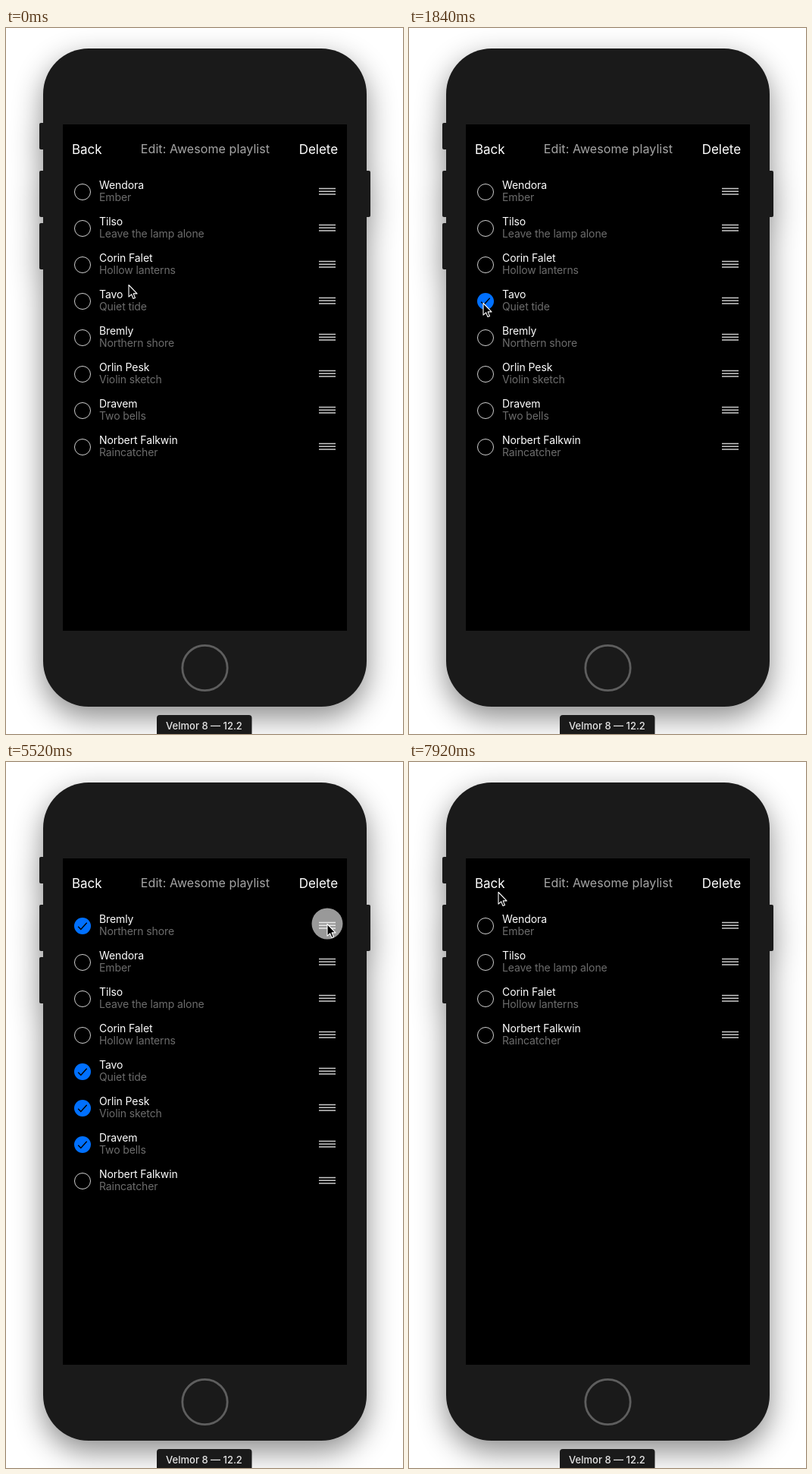
Write an HTML page that moves like this. It is 524 px wide and 930 px high and loops after 8 s.

```html
<!DOCTYPE html>
<html lang="en">
<head>
<meta charset="utf-8">
<title>Playlist editor</title>
<style>
  html, body { margin: 0; width: 100%; height: 100%; overflow: hidden; background: #fff; }
  .stage { position: relative; width: 524px; height: 930px; overflow: hidden; }
  .phone { position: absolute; inset: 0; filter: drop-shadow(0 14px 19px rgba(0, 0, 0, .46)); }
  .phone div { position: absolute; background: #1a1a1a; }
  .body { left: 49px; top: 27px; width: 427px; height: 867px; border-radius: 60px; }
  .key { left: 44px; width: 8px; height: 61px; border-radius: 2px; }
  svg { position: absolute; left: 0; top: 0; }
  text { font-family: Inter, Roboto, sans-serif; }
  .bar { font-size: 17px; letter-spacing: -.05px; fill: #fff; }
  .title { font-size: 16px; fill: #a6a6a6; letter-spacing: .08px; }
  .name, .song { font-size: 14px; letter-spacing: -.1px; fill: #fff; }
  .song { fill: #6c6c6c; }
  .model { font-size: 13px; font-weight: 500; fill: #e6e6e6; }
</style>
</head>
<body>
<div class="stage">
  <div class="phone">
    <div class="key" style="top: 125px; height: 35px"></div>
    <div class="key" style="top: 188px"></div>
    <div class="key" style="top: 257px"></div>
    <div class="key" style="top: 188px; left: 473px"></div>
    <div class="body"></div>
  </div>
  <svg width="524" height="930" viewBox="0 0 524 930">
    <rect x="199" y="905" width="125.5" height="40" rx="4" fill="#1a1a1a"/>
    <rect x="75" y="127" width="375" height="667"/>
    <circle cx="262.5" cy="843" r="29.7" fill="none" stroke="#5e5e5e" stroke-width="2.8"/>
    <text class="model" x="261.5" y="924" text-anchor="middle">Velmor 8 — 12.2</text>
    <text class="bar" x="87" y="165.5">Back</text>
    <text class="bar title" x="263" y="165" text-anchor="middle">Edit: Awesome playlist</text>
    <text class="bar" x="438" y="165.5" text-anchor="end">Delete</text>
    <g id="list"></g>
    <circle id="touch" r="20.5" fill="#fff"/>
    <path id="cursor" d="M0 0V15.6L3.6 12.3L6 18L8.5 17L6.1 11.4H11Z" stroke="#fff" stroke-width="1.1" stroke-linejoin="round"/>
  </svg>
</div>
<script>
const LOOP = 8000, STEP = 80, PITCH = 48, TAP = 160;
const DRAGGED = 4, GRAB = 4640, DROP = 5520, REMOVE = 7120;

const songs = [
  ["Wendora", "Ember"],
  ["Tilso", "Leave the lamp alone"],
  ["Corin Falet", "Hollow lanterns"],
  ["Tavo", "Quiet tide"],
  ["Bremly", "Northern shore"],
  ["Orlin Pesk", "Violin sketch"],
  ["Dravem", "Two bells"],
  ["Norbert Falkwin", "Raincatcher"]
];

// Row index: time it is tapped
const taps = { 3: 1360, 4: 2720, 5: 2240, 6: 3200 };
const presses = [[480, 720], [GRAB, DROP], [6880, 7040],
                 ...Object.values(taps).map(t => [t, t + TAP])];

// Cursor moves: leave, arrive, x, y, downward bow
const moves = [
  [79, 80, 222, 325],
  [480, 720, 205, 350],
  [800, 1280, 98, 362],
  [1840, 2200, 99, 458],
  [2480, 2720, 99, 388],
  [2960, 3200, 101, 504],
  [3540, 4240, 494, 264],
  [4240, 4480, 425, 410],
  [4740, 5200, 424, 213],
  [6000, 6760, 421, 161],
  [7400, 7920, 118, 171, 30]
];

const $ = id => document.getElementById(id);
const clamp = v => Math.max(0, Math.min(1, v));
const smooth = v => (v = clamp(v), v * v * (3 - 2 * v));
const show = (el, on) => el.setAttribute("visibility", on ? "inherit" : "hidden");
const place = (el, x, y) => el.setAttribute("transform", `translate(${x} ${y})`);

function cursorAt(t) {
  let x = 162, y = 338;
  for (const [leave, arrive, toX, toY, bow = 0] of moves) {
    const p = smooth((t - leave) / (arrive - leave));
    x += (toX - x) * p;
    y += (toY - y) * p + bow * Math.sin(Math.PI * p);
  }
  return [x, y];
}

function makeRow([name, song]) {
  const g = document.createElementNS("http://www.w3.org/2000/svg", "g");
  g.innerHTML = `
    <rect class="back" x="75" y="192" width="375" height="48" fill-opacity=".35"/>
    <circle class="ring" cx="101" cy="216" r="10.5" fill="none" stroke="#d0d0d0"/>
    <g class="tick"><circle cx="101" cy="216" r="11" fill="#0070ff"/>
      <path d="M95.2 216.8L98.8 220.4L106.7 211.7" fill="none" stroke="#000" stroke-width="1.4"/></g>
    <text class="name" x="123" y="212">${name}</text>
    <text class="song" x="123" y="228">${song}</text>
    <path d="M413 211.5H435M413 215.2H435M413 219H435" stroke="#cacaca" stroke-width="1.5"/>`;
  const part = name => g.querySelector("." + name);
  return { g, back: part("back"), ring: part("ring"), tick: part("tick") };
}

const rows = songs.map(makeRow);
$("list").append(...rows.map(r => r.g));
$("list").append(rows[DRAGGED].g);

// Rubber-band pull that springs back after release
const pull = t => 15 * smooth((t - 480) / 240) * Math.exp(-Math.max(0, t - 720) / 120);

function rowY(i, t) {
  if (i === DRAGGED) {
    const lift = t < GRAB ? 0 : 410 - cursorAt(t - 25)[1];
    return t < DROP ? Math.max(0, i * PITCH - lift) : 0;
  }
  // Rows above make room one after another, nearest first
  const room = i < DRAGGED ? smooth((t - 4900 - 90 * (DRAGGED - 1 - i)) / 200) : 0;
  return PITCH * (i + room);
}

function drawRows(t) {
  const removed = t >= REMOVE;
  let slot = 0;
  rows.forEach((r, i) => {
    const ticked = t >= taps[i] + TAP, held = i === DRAGGED && t >= GRAB + STEP && t < DROP;
    const gone = ticked && removed;
    const y = removed ? PITCH * slot : rowY(i, t);
    if (!gone) slot++;
    place(r.g, 0, y + pull(t));
    show(r.g, !gone);
    show(r.back, held);
    show(r.ring, !ticked);
    show(r.tick, ticked);
    r.g.setAttribute("opacity", held ? .68 : 1);
  });
}

function drawPointer(t) {
  const [x, y] = cursorAt(t);
  const press = presses.find(([a, b]) => t >= a && t < b + TAP);
  place($("cursor"), x, y + .5);
  place($("touch"), ...cursorAt(t - 16));
  $("touch").setAttribute("opacity", press ? .6 * (1 - clamp((t - press[1]) / TAP)) : 0);
}

const start = performance.now();
function frame() {
  const t = Math.floor((performance.now() - start) % LOOP / STEP) * STEP;
  drawRows(t);
  drawPointer(t);
  requestAnimationFrame(frame);
}
frame();
</script>
</body>
</html>
```
